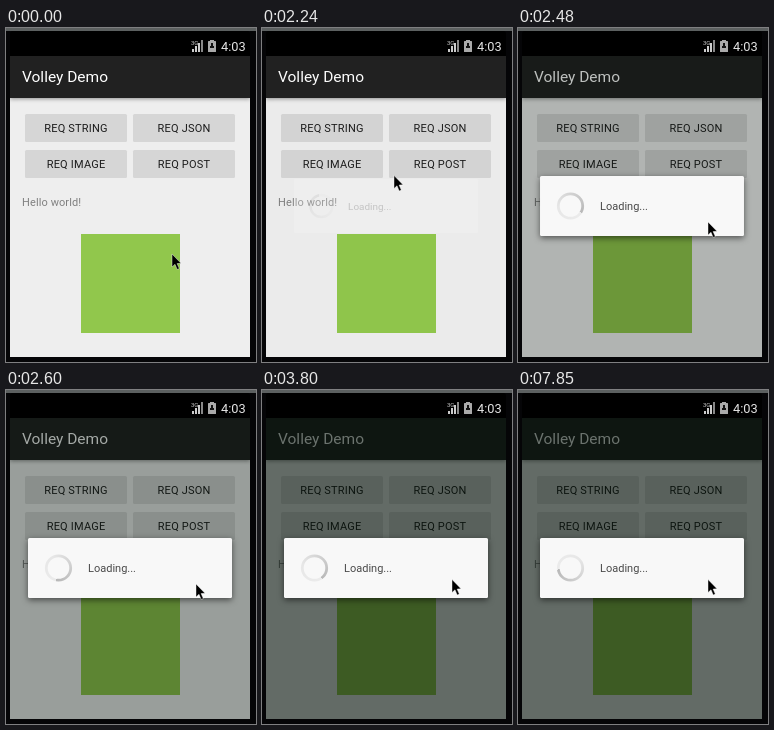
Animation of 250x334 px, one loop 8000 ms. Source, as an HTML page with a canvas:

```html
<!DOCTYPE html>
<html lang="en">
<head>
<meta charset="utf-8">
<title>Volley Demo</title>
<style>
  html, body { margin: 0; width: 100%; height: 100%; overflow: hidden; background: #050507; }
  canvas { display: block; }
</style>
</head>
<body>
<canvas id="stage" width="250" height="334"></canvas>
<script>
const ctx = document.getElementById('stage').getContext('2d');
const LOOP = 8000, PRESS = 1950, OPEN = 2240, SETTLED = 2600;

// The pointer hops to each place in a few equal steps.
const pointerStart = { x: 166, y: 226 };
const pointerMoves = [
  { at: 250, every: 142, steps: 5, x: 178, y: 180 },
  { at: 1220, every: 140, steps: 4, x: 74, y: 101 },
  { at: OPEN, every: 120, steps: 2, x: 190, y: 194 },
  { at: 2750, every: 150, steps: 1, x: 190, y: 189.5 }
];

const easeOut = p => 1 - (1 - Math.min(1, Math.max(0, p))) ** 2;

// The dialog is redrawn at fixed intervals, faster while it opens.
function snap(t) {
  const interval = t < SETTLED ? 120 : 150;
  return SETTLED + Math.floor((t - SETTLED) / interval) * interval;
}

function pointerAt(t) {
  let { x, y } = pointerStart;
  for (const move of pointerMoves) {
    if (t < move.at) break;
    const hops = Math.floor((t - move.at) / move.every) + 1;
    const progress = Math.min(1, hops / move.steps);
    x += (move.x - x) * progress;
    y += (move.y - y) * progress;
  }
  return [x, y];
}

function box(x, y, w, h, color, radius = 0) {
  ctx.fillStyle = color;
  ctx.beginPath();
  ctx.roundRect(x, y, w, h, radius);
  ctx.fill();
}

function label(text, x, y, size, color, align = 'left', spacing = 0) {
  ctx.font = `400 ${size}px Roboto, sans-serif`;
  ctx.letterSpacing = spacing + 'px';
  ctx.textAlign = align;
  ctx.fillStyle = color;
  ctx.fillText(text, x, y);
}

function withShadow(color, blur, offset, draw) {
  ctx.save();
  ctx.shadowColor = color;
  ctx.shadowBlur = blur;
  ctx.shadowOffsetY = offset;
  draw();
  ctx.restore();
}

function button(text, x, y, pressed) {
  box(x, y, 102, 28, pressed ? '#c2c2c2' : '#d6d6d6', 1.5);
  label(text, x + 51, y + 18, 11, '#1c1c1c', 'center', 0.2);
}

function statusBar() {
  box(4, 3, 240, 25, '#000', [3, 3, 0, 0]);
  for (let bar = 0; bar < 4; bar++) {
    const height = 3 + bar * 3;
    box(186 + bar * 3, 24 - height, 2, height, bar < 3 ? '#ccc' : '#888');
  }
  label('3G', 185, 17, 6, '#ccc');
  box(204, 12, 4, 2, '#aaa');
  box(202, 13, 8, 11, '#aaa', 0.5);
  box(205, 15, 2, 4, '#111');
  box(204, 18, 4, 2, '#111');
  label('4:03', 215, 23, 12.8, '#e4e4e4');
}

function app(pressed) {
  box(4, 28, 240, 301, '#eee');
  withShadow('rgba(0,0,0,.4)', 4, 1, () => box(4, 28, 240, 42, '#212121'));
  label('Volley Demo', 16, 54, 15.5, '#fff');
  button('REQ STRING', 19, 86, pressed);
  button('REQ JSON', 127, 86);
  button('REQ IMAGE', 19, 122);
  button('REQ POST', 127, 122);
  label('Hello world!', 16, 178, 11, '#808080', 'left', 0.1);
  box(75, 206, 99, 99, '#91c74c');
}

function spinner(t) {
  const head = (100 + (t - SETTLED) / 640 * 360) * Math.PI / 180;
  const sweep = ctx.createConicGradient(head, 52.5, 178);
  sweep.addColorStop(0, 'rgba(0,0,0,.05)');
  sweep.addColorStop(0.4, 'rgba(0,0,0,.07)');
  sweep.addColorStop(1, 'rgba(0,0,0,.26)');
  ctx.strokeStyle = sweep;
  ctx.lineWidth = 2.8;
  ctx.beginPath();
  ctx.arc(52.5, 178, 12.2, 0, Math.PI * 2);
  ctx.stroke();
}

function dialog(t) {
  const shown = easeOut((t - 2200) / 290);
  const scale = 0.87 + 0.13 * shown;
  ctx.save();
  ctx.globalAlpha = shown;
  ctx.translate(124, 178);
  ctx.scale(scale, scale);
  ctx.translate(-124, -178);
  withShadow(`rgba(0,0,0,${0.55 * shown ** 3})`, 6, 2, () => box(22, 148, 204, 60, '#f8f8f8', 1.5));
  spinner(t);
  label('Loading...', 82, 182, 11, '#4a4a4a');
  ctx.restore();
}

function pointer(x, y) {
  ctx.save();
  ctx.translate(x, y);
  const arrow = new Path2D('M0 0V13L3 10.3 5.2 15.5 7.3 14.6 5.1 9.6 9 9.3Z');
  ctx.fillStyle = '#000';
  ctx.fill(arrow);
  ctx.strokeStyle = 'rgba(255,255,255,.7)';
  ctx.lineWidth = 0.6;
  ctx.stroke(arrow);
  ctx.restore();
}

function render(t) {
  box(0, 0, 250, 334, '#050507');
  box(0, 0, 250, 3, '#5c6060');
  statusBar();

  ctx.save();
  ctx.beginPath();
  ctx.rect(4, 28, 240, 301);
  ctx.clip();
  app(t >= PRESS && t < OPEN);
  if (t >= OPEN) {
    const now = snap(t);
    const dim = 0.58 * easeOut((now - 2230) / 970);
    box(4, 28, 240, 301, `rgba(0,14,6,${dim})`);
    dialog(now);
  }
  ctx.restore();

  pointer(...pointerAt(t));
}

const start = performance.now();
function loop() {
  render((performance.now() - start) % LOOP);
  requestAnimationFrame(loop);
}
loop();
</script>
</body>
</html>
```
